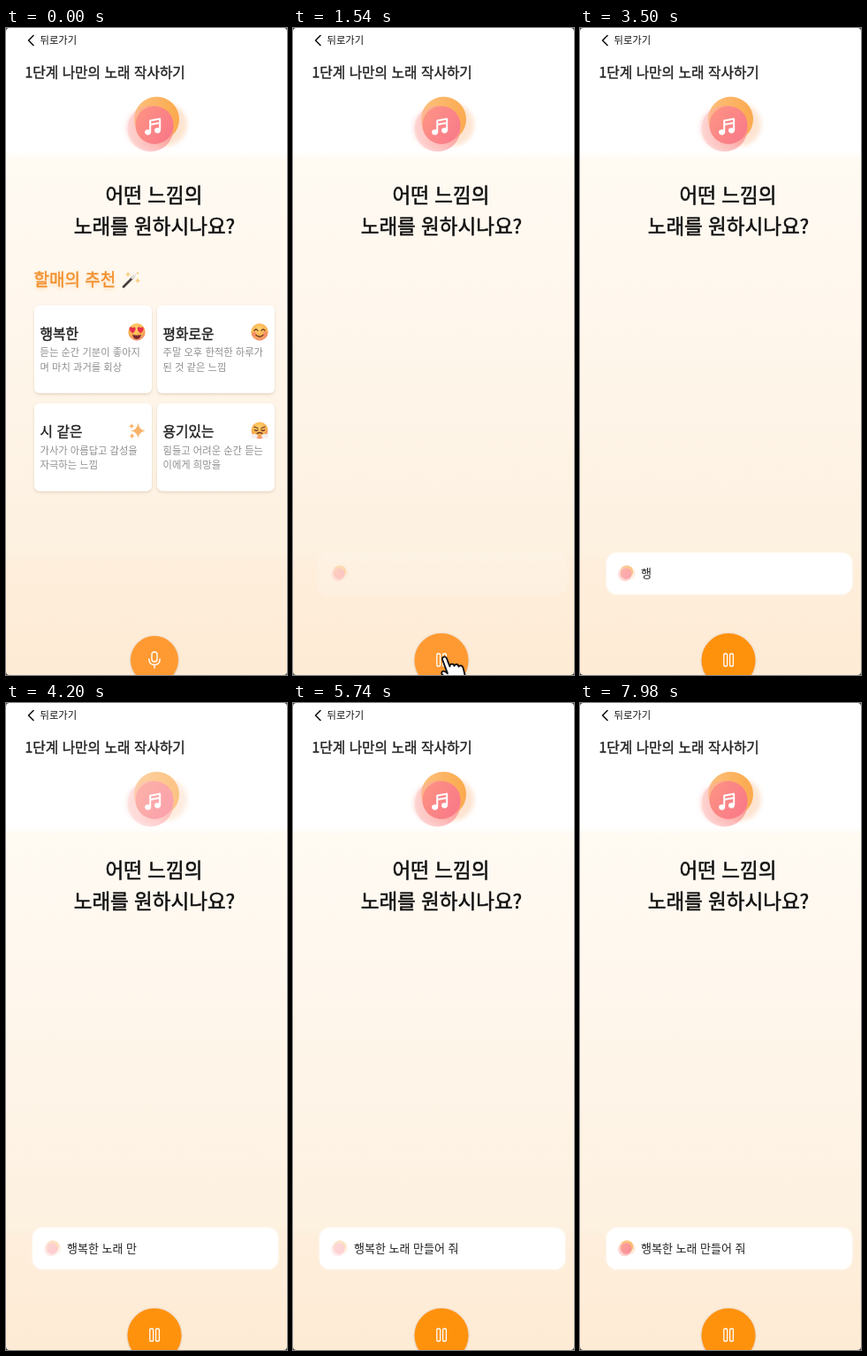
An HTML page for the animation above (8000 ms loop, 318 by 730 pixels).

```html
<!DOCTYPE html>
<html lang="ko">
<head>
<meta charset="utf-8">
<title>노래 작사하기</title>
<style>
  html, body { margin: 0; width: 100%; height: 100%; overflow: hidden; background: #444; }
  svg { display: block; width: 318px; height: 730px; }
  text {
    font-family: "Noto Sans CJK KR", "Noto Sans CJK", "Noto Sans", sans-serif;
    white-space: pre; fill: #111;
  }
  .back { font-size: 11.3px; font-weight: 500; }
  .title, .name { font-size: 15.75px; font-weight: 500; fill: #222; stroke: #222; stroke-width: .4px; }
  .ask { font-size: 22.5px; font-weight: 500; text-anchor: middle; stroke: #111; stroke-width: .55px; }
  .pick { font-size: 19px; font-weight: 500; fill: #f28f2b; stroke: #f28f2b; stroke-width: .4px; }
  .desc { font-size: 11.3px; fill: #8f8f8f; }
  .said { font-size: 13px; fill: #222; }
  .line { fill: none; stroke: #fff; stroke-linecap: round; stroke-linejoin: round; }
</style>
</head>
<body>
<svg viewBox="0 0 318 730">
  <defs>
    <linearGradient id="sky" x1="0" y1="0" x2="0" y2="1">
      <stop offset="0" stop-color="#fff"/>
      <stop offset=".19" stop-color="#fff"/>
      <stop offset=".205" stop-color="#fffaf2"/>
      <stop offset=".37" stop-color="#fff8ef"/>
      <stop offset=".6" stop-color="#fef4e7"/>
      <stop offset=".81" stop-color="#fdf1e0"/>
      <stop offset=".83" stop-color="#feeedb"/>
      <stop offset="1" stop-color="#feebd5"/>
    </linearGradient>
    <linearGradient id="amber" x1="0" y1="0" x2="1" y2="0">
      <stop offset="0" stop-color="#fcc07c"/>
      <stop offset="1" stop-color="#fba94c"/>
    </linearGradient>
    <linearGradient id="rose" x1="0" y1="0" x2="1" y2="0">
      <stop offset="0" stop-color="#fdb0ac" stop-opacity=".3"/>
      <stop offset="1" stop-color="#fb9090" stop-opacity=".8"/>
    </linearGradient>
    <linearGradient id="core" x1="0" y1="0" x2="1" y2=".6">
      <stop offset="0" stop-color="#fd9482"/>
      <stop offset="1" stop-color="#f97a88"/>
    </linearGradient>
    <radialGradient id="face" cx=".45" cy=".3" r=".75">
      <stop offset="0" stop-color="#ffd36e"/>
      <stop offset=".6" stop-color="#fbb04f"/>
      <stop offset="1" stop-color="#f0837a"/>
    </radialGradient>
    <filter id="soft" x="-50%" y="-50%" width="200%" height="200%"><feGaussianBlur stdDeviation=".7"/></filter>
    <filter id="haze" x="-50%" y="-50%" width="200%" height="200%"><feGaussianBlur stdDeviation="2.5"/></filter>
    <filter id="drop" x="-20%" y="-20%" width="140%" height="150%">
      <feDropShadow dx="0" dy="1.5" stdDeviation="1.5" flood-color="#a08060" flood-opacity=".28"/>
    </filter>
    <filter id="rim" x="-20%" y="-20%" width="140%" height="140%">
      <feDropShadow dx="0" dy=".5" stdDeviation="1.2" flood-color="#8a7050" flood-opacity=".5"/>
    </filter>
    <filter id="glow" x="-20%" y="-30%" width="140%" height="160%">
      <feDropShadow dx="0" dy="0" stdDeviation="1.5" flood-color="#fff" flood-opacity=".8"/>
    </filter>
    <filter id="warm" x="-10%" y="-20%" width="120%" height="150%">
      <feDropShadow dx="0" dy="2" stdDeviation="2" flood-color="#f7b560" flood-opacity=".4"/>
    </filter>
    <g id="orb">
      <circle cx="13" cy="1" r="24" fill="#fdd9be" opacity=".7" filter="url(#haze)"/>
      <circle cx="-9" cy="5" r="23" fill="#fcc2bc" opacity=".5" filter="url(#haze)"/>
      <g filter="url(#soft)">
        <circle cx="2.5" cy="-5" r="25.5" fill="url(#amber)"/>
        <circle cx="-4.5" cy="5.5" r="26" fill="url(#rose)"/>
        <circle cx="0" cy="1.5" r="21.5" fill="url(#core)"/>
      </g>
    </g>
  </defs>

  <rect width="318" height="730" rx="4" fill="url(#sky)"/>
  <path class="line" d="M31 8.5L25.5 14L31 19.5" style="stroke:#111;stroke-width:1.6"/>
  <text class="back" x="38.5" y="17.5">뒤로가기</text>
  <text class="title" x="21.5" y="55.8">1단계 나만의 노래 작사하기</text>

  <use id="bigOrb" href="#orb" x="168" y="108"/>
  <g fill="#fff">
    <ellipse cx="160.6" cy="117.6" rx="3.5" ry="3.1"/>
    <ellipse cx="171.5" cy="115.6" rx="3.5" ry="3.1"/>
    <path class="line" d="M163.2 117V104.6L174.2 102.6V115M163.2 109L174.2 107" stroke-width="2"/>
  </g>

  <text class="ask" x="167.5" y="197.4">어떤 느낌의</text>
  <text class="ask" x="168" y="232.4">노래를 원하시나요?</text>

  <g id="picks">
    <text class="pick" x="31.5" y="291" filter="url(#warm)">할매의 추천</text>
    <g stroke-linecap="round">
      <path d="M133 292L144 281" stroke="#4a4040" stroke-width="2.8"/>
      <path d="M143 282L146 279" stroke="#e8e2dc" stroke-width="2.8"/>
      <path d="M138 276v4M136 278h4M149 283v4M147 285h4M149 275.5v2" stroke="#f9bd58" stroke-width="1.2"/>
    </g>
    <g id="cards"></g>
    <g transform="translate(148 343)">
      <circle r="9.7" fill="url(#face)"/>
      <path id="heart" d="M-4.5 1.5C-11 -3 -8 -8 -4.7 -4.7C-1 -7.5 .5 -2.5 -4.5 1.5Z" fill="#e8304e"/>
      <use href="#heart" x="9"/>
      <path d="M-5 3Q0 4.5 5 3Q4 8 0 8Q-4 8 -5 3Z" fill="#7a2a30"/>
    </g>
    <g transform="translate(287 343)">
      <circle r="9.7" fill="url(#face)"/>
      <circle cx="-6" cy="2.5" r="2.4" fill="#f58070" opacity=".7"/>
      <circle cx="6" cy="2.5" r="2.4" fill="#f58070" opacity=".7"/>
      <path class="line" d="M-6 -1.5Q-4 -4.5 -2 -1.5M2 -1.5Q4 -4.5 6 -1.5M-4 3.5Q0 7 4 3.5" style="stroke:#6b3a28;stroke-width:1.3"/>
    </g>
    <g transform="translate(148 454)" fill="#f8b36a">
      <path id="spark" d="M1.5 -8.5Q2.5 -.5 9.5 .5Q2.5 1.5 1.5 9Q.5 1.5 -6.5 .5Q.5 -.5 1.5 -8.5Z"/>
      <use href="#spark" transform="translate(-6.5 -5) scale(.42)"/>
      <use href="#spark" transform="translate(-6 6) scale(.42)"/>
    </g>
    <g transform="translate(287 454)">
      <circle r="9.5" fill="url(#face)"/>
      <path class="line" d="M-6 -4L-2 -2.5M6 -4L2 -2.5M-5.5 -.5Q-4 1 -2 -.5M2 -.5Q4 1 5.5 -.5M-3 3.5Q0 1.5 3 3.5" style="stroke:#6b3a28;stroke-width:1.3"/>
      <g fill="#f4eeee">
        <ellipse cx="-6" cy="6.5" rx="3.8" ry="2.6"/><ellipse cx="6" cy="6.5" rx="3.8" ry="2.6"/>
      </g>
    </g>
  </g>

  <g id="bar">
    <rect x="30" y="592" width="278" height="47" rx="12" fill="#fff" filter="url(#glow)"/>
    <text id="said" class="said" x="69" y="619.9"></text>
  </g>
  <use id="dot" href="#orb" transform="translate(52 615) scale(.29)"/>

  <g id="mic">
    <circle cx="168" cy="713" r="27" fill="#ff9a33" filter="url(#rim)"/>
    <g class="line" stroke-width="1.4">
      <rect x="165" y="704" width="6" height="11" rx="3"/>
      <path d="M161.8 712Q162 718.5 168 718.5Q174 718.5 174.2 712M168 718.5V722"/>
    </g>
  </g>
  <g id="pause">
    <circle id="disc" cx="168" cy="713.5" r="30.5" filter="url(#rim)"/>
    <g class="line" stroke-width="1.3">
      <rect x="162.8" y="706" width="3.8" height="14" rx="1"/>
      <rect x="169.6" y="706" width="3.8" height="14" rx="1"/>
    </g>
  </g>

  <path id="hand" fill="#fff" stroke="#111" stroke-width="1.6" stroke-linejoin="round"
    d="M1 2.5C0 -.5 4 -1.8 5.2 1.2L8.2 9C8 6.2 12 5.6 12.6 8.6C13.2 6.2 16.6 6.4 17 9.2C18 7.4 21 8 21.4 10.6L23 17C23.6 20 22.6 22 22.8 25L11.5 27C9 23.5 4.5 20.5 1.2 17.4C-1.2 15 1.2 12.6 3.8 14.2L6 15.8Z"/>
</svg>

<script>
  const LOOP = 8000, START = 1400;
  const PHRASE = '행복한 노래 만들어 줘';
  const CARDS = [
    [32, 313, '행복한', '듣는 순간 기분이 좋아지', '며 마치 과거를 회상'],
    [171, 313, '평화로운', '주말 오후 한적한 하루가', '된 것 같은 느낌'],
    [32, 423.5, '시 같은', '가사가 아름답고 감성을', '자극하는 느낌'],
    [171, 423.5, '용기있는', '힘들고 어려운 순간 듣는', '이에게 희망을']
  ];
  const $ = id => document.getElementById(id);

  $('cards').innerHTML = CARDS.map(([x, y, name, top, low]) => `
    <rect x="${x}" y="${y}" width="133" height="99" rx="6" fill="#fff" filter="url(#drop)"/>
    <text class="name" x="${x + 6.5}" y="${y + 37.7}">${name}</text>
    <text class="desc" x="${x + 6.5}" y="${y + 57}">${top}</text>
    <text class="desc" x="${x + 6.5}" y="${y + 73.5}">${low}</text>`).join('');

  // Linear interpolation through [ms, value] steps
  function at(steps, t) {
    let [t0, v0] = steps[0];
    for (const [t1, v1] of steps) {
      if (t < t1) return t1 > t0 ? v0 + (v1 - v0) * (t - t0) / (t1 - t0) : v1;
      [t0, v0] = [t1, v1];
    }
    return v0;
  }

  const wave = (t, period, peak) => (1 + Math.cos(2 * Math.PI * (t - peak) / period)) / 2;

  const HAND_X = [[70, 64], [140, 92], [210, 142], [280, 166], [490, 166], [560, 168]];
  const HAND_Y = [[70, 282], [140, 470], [210, 650], [280, 707], [490, 707], [560, 710]];
  const PRESS = [[770, 1], [840, .95], [910, 1]];
  const PICKS = [[START, 1], [1520, 0]];
  const BAR = [[START, 0], [1540, .2], [1960, 1]];
  const GROW = [[1540, 1.014], [1960, 1]];
  const GREEN = [[1540, 154], [1960, 146]];
  const BLUE = [[1540, 48], [1960, 15]];

  const zoom = (x, y, k) => `translate(${x} ${y}) scale(${k}) translate(${-x} ${-y})`;

  function draw(t) {
    const live = t >= START;
    $('bigOrb').style.opacity = live ? .47 + .53 * wave(t, 2200, START) : 1;
    $('picks').style.opacity = at(PICKS, t);
    $('bar').style.opacity = at(BAR, t);
    $('bar').setAttribute('transform', zoom(169, 615.5, at(GROW, t)));
    $('dot').style.opacity = live ? .35 + .65 * wave(t, 1360, 2380) ** 2 : 0;
    $('said').textContent = PHRASE.slice(0, Math.max(0, Math.floor((t - 3320) / 100)));

    $('mic').style.display = live ? 'none' : '';
    $('mic').setAttribute('transform', zoom(168, 713, at(PRESS, t)));
    $('pause').style.display = live ? '' : 'none';
    $('disc').style.fill = `rgb(255, ${at(GREEN, t)}, ${at(BLUE, t)})`;

    $('hand').style.display = t >= 70 && t < 1890 ? '' : 'none';
    $('hand').setAttribute('transform', `translate(${at(HAND_X, t)} ${at(HAND_Y, t)}) scale(1.15)`);
  }

  const begin = performance.now();
  function tick() {
    draw((performance.now() - begin) % LOOP);
    requestAnimationFrame(tick);
  }
  draw(0);
  requestAnimationFrame(tick);
</script>
</body>
</html>
```
